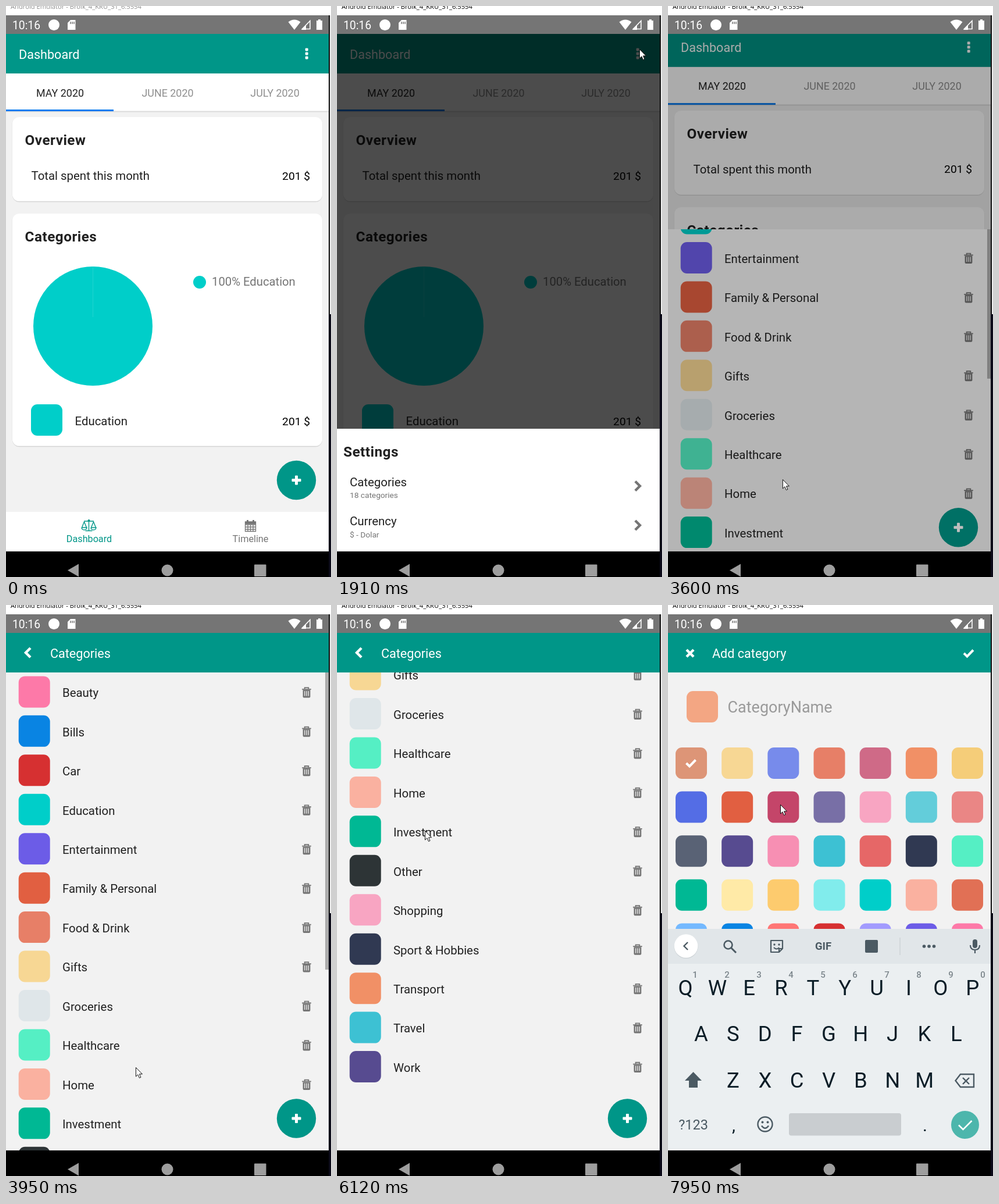
Write an HTML page that moves like this. It is 559 by 982 pixels and loops after 8000 ms.

```html
<!DOCTYPE html>
<html lang="en">
<head>
<meta charset="utf-8">
<title>Budget app</title>
<style>
  html, body { margin: 0; width: 100%; height: 100%; overflow: hidden; background: #fff; }
  svg { display: block; width: 100%; height: 100%; }
  text { font-family: Roboto, sans-serif; white-space: pre; }
</style>
</head>
<body>
<svg id="stage" viewBox="0 0 559 982" xmlns="http://www.w3.org/2000/svg"></svg>
<script>
const LOOP = 8000, STEP = 67.5, TOP = 48, BOTTOM = 938, WIDTH = 555, HEIGHT = BOTTOM - TOP;
const TEAL = '#009688', INK = '#212121', GRAY = '#757575', PAPER = '#f2f2f2';
const ROW = 67.45, MAX_SCROLL = 502, VIEW = 822, CONTENT = 1322;

// ---- markup helpers ----
const rect = (x, y, w, h, fill, extra = '') =>
  `<rect x="${x}" y="${y}" width="${w}" height="${h}" fill="${fill}" ${extra}/>`;
const dot = (x, y, r, fill, extra = '') =>
  `<circle cx="${x}" cy="${y}" r="${r}" fill="${fill}" ${extra}/>`;
const text = (x, y, size, str, fill = INK, extra = '') =>
  `<text x="${x}" y="${y}" font-size="${size}" fill="${fill}" ${extra}>${str}</text>`;
const line = (d, color, w, extra = '') =>
  `<path d="${d}" fill="none" stroke="${color}" stroke-width="${w}" ${extra}/>`;
const shape = (d, fill) => `<path d="${d}" fill="${fill}"/>`;
const group = (id, body, extra = '') => `<g id="${id}" ${extra}>${body}</g>`;
const at = (x, y, body) => `<g transform="translate(${x} ${y})">${body}</g>`;
const MID = 'text-anchor="middle"', END = 'text-anchor="end"';
const ROUND = 'stroke-linecap="round" stroke-linejoin="round"';

const swatch = (x, y, fill) => rect(x, y, 54, 54, fill, 'rx="11"');
const heading = (x, y, str) => text(x, y, 24.3, str, INK, 'font-weight="700" letter-spacing=".5"');
const header = (x, title) => rect(0, TOP, WIDTH, 68, TEAL) + text(x, 90.5, 21.6, title, '#fff');
const check = (x, y, s) => at(x, y, line(`M${-8 * s} 0L${-2.5 * s} ${5.5 * s}L${8 * s} ${-5.5 * s}`, '#fff', 4 * s));
const chevron = (x, y, dir, color) => at(x, y, line(`M${-4 * dir} -8L${4 * dir} 0L${-4 * dir} 8`, color, 4.4));
const fab = (id, y) => group(id, dot(499.5, y, 33.7, TEAL) +
  rect(491.5, y - 2.5, 16, 5, '#fff', 'rx="1"') + rect(497, y - 8, 5, 16, '#fff', 'rx="1"'));
const trash = y => at(517, y,
  line('M-7.8 -5.5H7.8M-3.3 -6V-8.3H3.3V-6', GRAY, 1.8) +
  shape('M-6.4 -4.5H6.4V7Q6.4 9 4.4 9H-4.4Q-6.4 9 -6.4 7Z', GRAY) +
  line('M-3.2 -2.5V6M0 -2.5V6M3.2 -2.5V6', PAPER, 1.3));

// ---- screens ----
function dashboard() {
  const card = (y, h) => rect(11, y + 1.2, 533, h, '#d4d4d4', 'rx="12"') +
    rect(10.5, y, 534, h, '#e6e6e6', 'rx="12"') + rect(11, y, 533, h - .5, '#fff', 'rx="11.5"');
  const tab = (x, str, color) => text(x, 155.5, 17.9, str, color, MID);
  const scales = at(142.5, 893,
    line('M0 -9V9M-6 9.5H6M-8.5 -7H8.5M-8 -6L-12 4M-8 -6L-4 4M8 -6L4 4M8 -6L12 4', TEAL, 1.4) +
    line('M-12.5 4H-3.5Q-4 8 -8 8T-12.5 4M3.5 4H12.5Q12 8 8 8T3.5 4', TEAL, 1.4) + dot(0, -8, 2, TEAL));
  const calendar = at(420.5, 894,
    line('M-9 -7H9V9.5H-9ZM-9 -2H9M-9 2H9M-9 6H9M-4.5 -2V9M0 -2V9M4.5 -2V9', GRAY, 1.3) +
    rect(-9, -7, 18, 4, GRAY) + line('M-5 -10V-5M5 -10V-5', GRAY, 3));
  return rect(0, TOP, WIDTH, HEIGHT + 30, PAPER) + header(22, 'Dashboard') +
    [75, 82, 89].map(y => rect(514.7, y - 2.6, 5, 5, '#fff', 'rx="1.3"')).join('') +
    rect(0, 116, WIDTH, 66.5, '#dcdcdc') + rect(0, 116, WIDTH, 64.5, '#fff') + rect(0, 178, 185, 3, '#0a7cf0') +
    tab(93, 'MAY 2020', INK) + tab(278, 'JUNE 2020', '#8f8f8f') + tab(462.5, 'JULY 2020', '#8f8f8f') +
    card(191, 145) + heading(32.5, 239, 'Overview') +
    text(43.5, 299, 20.4, 'Total spent this month') + text(523, 298.5, 19.2, '201 $', '#000', END) +
    card(357, 400) + heading(32.5, 405, 'Categories') +
    dot(149.5, 550.5, 102.5, '#00cec9') + line('M149.5 448V535', '#22d4d0', 1) +
    dot(333, 475, 11, '#00cec9') + text(354, 481, 20.25, '100% Education', GRAY) +
    swatch(43, 685, '#00cec9') + text(118.5, 721, 20.4, 'Education') + text(523, 720.5, 19.2, '201 $', '#000', END) +
    fab('dashFab', 815.5) + rect(0, 870, WIDTH, 98, '#fff') + scales + calendar +
    text(143, 922, 16.2, 'Dashboard', TEAL, MID) + text(420.5, 922, 16.2, 'Timeline', GRAY, MID);
}

const CATEGORIES = `Beauty fd79a8,Bills 0984e3,Car d63031,Education 00cec9,Entertainment 6c5ce7,
Family &amp; Personal e15f41,Food &amp; Drink e77f67,Gifts f7d794,Groceries dfe6e9,Healthcare 55efc4,
Home fab1a0,Investment 00b894,Other 2d3436,Shopping f8a5c2,Sport &amp; Hobbies 303952,
Transport f19066,Travel 3dc1d3,Work 574b90`.split(',').map(s => s.trim());

function categories() {
  const rows = CATEGORIES.map((entry, i) => {
    const cut = entry.lastIndexOf(' '), y = 122.4 + i * ROW;
    return swatch(21.7, y, '#' + entry.slice(cut + 1)) +
      text(97, y + 35.8, 20.4, entry.slice(0, cut)) + trash(y + 28);
  }).join('');
  return rect(0, TOP, WIDTH, HEIGHT + 40, PAPER) + group('list', rows) +
    rect(549, 116, 6, VIEW * VIEW / CONTENT, '#000', 'id="bar"') +
    header(76, 'Categories') + chevron(38, 82, -1, '#fff') + fab('listFab', 883);
}

const PALETTE = `dd9577 f7d794 778beb e77f67 cf6a87 f19066 f5cd79 546de5 e15f41 c44569 786fa6 f8a5c2 63cdda ea8685
596275 574b90 f78fb3 3dc1d3 e66767 303952 55efc4 00b894 ffeaa7 fdcb6e 81ecec 00cec9 fab1a0 e17055
74b9ff 0984e3 ff7675 d63031 a29bfe 6c5ce7 fd79a8 dfe6e9 b2bec3 636e72 2d3436`.split(/\s+/);

function addCategory() {
  const grid = PALETTE.map((c, i) =>
    swatch(13 + i % 7 * 79.17, 245 + Math.floor(i / 7) * 75.6, '#' + c)).join('');
  return rect(0, TOP, WIDTH, HEIGHT + 40, PAPER) + header(76, 'Add category') +
    line('M32 77L44 89M44 77L32 89', '#fff', 4.4) + check(517, 83, 1) +
    swatch(32, 148, '#f3a683') + text(102.5, 185, 27, 'CategoryName', '#9a9a9a') +
    grid + check(39.5, 272, 1);
}

function keyboard() {
  const tone = '#4b5a63', ink = '#0b1d27';
  const keys = (str, x, y) => [...str].map((c, i) => text(x + i * 54.85, y, 36.5, c, ink, MID)).join('');
  const hints = [...'1234567890'].map((c, i) =>
    text(46.5 + i * 55, 641, 15, c, '#7b858b', MID + ' font-weight="500"')).join('');
  const face = at(167, 893, dot(0, 0, 12.5, 'none', `stroke="${tone}" stroke-width="2.4"`) +
    dot(-4.5, -3.5, 2, tone) + dot(4.5, -3.5, 2, tone) + line('M-6 2.5Q0 11 6 2.5', tone, 2.4));
  const mic = at(528, 587, rect(-4, -12, 8, 15, tone, 'rx="4"') +
    line('M-8 -2Q-8 6 0 6T8 -2M0 6V12', tone, 2.2));
  const sticker = at(187, 587, line('M-10 -10H10V4L4 10H-10ZM4 10V4H10', tone, 2.2, ROUND) +
    dot(-4, -3, 1.7, tone) + dot(4, -3, 1.7, tone) + line('M-5 2Q0 7 4 2', tone, 2));
  return rect(0, 557, WIDTH, 60, '#e1e6e9') + rect(0, 617, WIDTH, 330, '#ebeff1') +
    dot(31, 587.5, 20.5, '#ccd2d6') + dot(31, 586.5, 20.3, '#fff') + line('M34 580L27.5 586.5L34 593', tone, 2.4) +
    dot(103.5, 584.5, 7, 'none', `stroke="${tone}" stroke-width="2.6"`) + line('M108.5 589.5L117 598', tone, 3) +
    sticker + text(267, 593, 18.5, 'GIF', tone, MID + ' font-weight="700"') + rect(339, 576, 22, 22, tone, 'rx="2"') +
    rect(398.5, 572, 1, 30, '#c3cace') + [440.5, 449, 457.5].map(x => dot(x, 587, 2.8, tone)).join('') + mic +
    hints + keys('QWERTYUIOP', 30, 671) + keys('ASDFGHJKL', 57, 750) + keys('ZXCVBNM', 112, 830) +
    shape('M43.5 803L58 818H51V830H36V818H29Z', tone) +
    line('M503 807H526V829H503L494.5 818ZM507 813L518 824M518 813L507 824', tone, 2.4) +
    text(43.5, 902, 23.5, '?123', tone, MID) + text(113, 905, 30, ',', ink, MID) + face +
    rect(208, 874, 193, 38.5, '#c9cdd0', 'rx="4"') + text(442, 905, 30, '.', ink, MID) +
    dot(511, 894, 24, '#4db6ac') + line('M500 894.5L507.5 902L522.5 887', '#fff', 2.6);
}

function settings() {
  const row = (y, title, note) => text(22, y, 20.4, title) +
    text(22, y + 20.5, 13.7, note, GRAY) + chevron(517, y, 1, GRAY);
  return rect(0, 727, WIDTH, 211, '#fff') + heading(11, 775, 'Settings') +
    rect(0, 793, WIDTH, 67, '#efefef', 'id="press"') +
    group('pressText', row(825.5, 'Categories', '18 categories')) + row(893, 'Currency', '$ - Dolar');
}

function chrome() {
  return rect(0, 16, WIDTH, 32, '#757575') + text(11, 40, 19.3, '10:16', '#fff') +
    dot(82.5, 32.5, 9.5, '#fff') +
    shape('M111 24H119.5V41H106V29Z', '#fff') + line('M111 27V31M114 27V31M117 27V31', '#757575', 1.5) +
    shape('M485.5 27.5Q496 19.5 506.5 27.5L496 41Z', '#fff') +
    line('M509.5 39.5L523 25.5V39.5Z', '#fff', 1.6) + shape('M508 41L516 33V41Z', '#fff') +
    shape('M534 25H537V23H541V25H544V41H534Z', '#fff') +
    rect(0, BOTTOM, WIDTH, 44, '#000') + shape('M106 970.5L125 959.5V981.5Z', '#9e9e9e') +
    dot(277.5, 970.5, 10, '#9e9e9e') + rect(427, 960.5, 20.5, 20.5, '#9e9e9e', 'rx="1"') +
    rect(WIDTH, 0, 4, 530, '#fff') + rect(WIDTH, 16, 2.2, 514, '#111') + rect(WIDTH, 530, 4, 452, '#0b0a18');
}

const clip = (id, y) => `<clipPath id="${id}"><rect x="0" y="${y}" width="${WIDTH}" height="${BOTTOM - y}"/></clipPath>`;
const shade = id => rect(0, TOP, WIDTH, HEIGHT, '#000', `id="${id}"`);

document.getElementById('stage').innerHTML =
  `<defs>${clip('app', TOP)}${clip('clipCats', TOP)}${clip('clipAdd', TOP)}</defs>` +
  rect(0, 0, 559, 982, '#fff') +
  `<text id="caption" x="8" y="4.5" font-size="11.2" style="font-family:'Open Sans',sans-serif">Android Emulator - Brolk_4_KRU_31_6:5554</text>` +
  `<g clip-path="url(#app)">` +
    group('dash', dashboard()) + shade('dashShade') +
    `<g clip-path="url(#clipCats)">${group('cats', categories())}</g>` + shade('catsShade') +
    `<g clip-path="url(#clipAdd)">${group('add', addCategory())}</g>` +
    group('keys', keyboard()) + shade('dim') + group('sheet', settings()) +
  `</g>` + chrome() + dot(0, 0, 12.5, '#f8f46a', 'id="halo" opacity=".9"') +
  group('cursor', `<path d="M.5 .5V16L4 12.7L6.5 18.5L9 17.4L6.6 11.8H11.5Z" fill="#fff" stroke="#111" stroke-width="1"/>`);

// ---- timing ----
const $ = Object.fromEntries([...document.querySelectorAll('[id]')].map(el => [el.id, el]));
const clamp = v => Math.max(0, Math.min(1, v));
const span = (t, start, length) => clamp((t - start) / length);
const smooth = p => p * p * (3 - 2 * p);
const easeOut = p => 1 - (1 - p) ** 3;

function bezier(x1, y1, x2, y2) {
  const f = (s, a, b) => 3 * (1 - s) ** 2 * s * a + 3 * (1 - s) * s * s * b + s ** 3;
  return x => {
    if (x <= 0 || x >= 1) return clamp(x);
    let lo = 0, hi = 1;
    for (let i = 0; i < 24; i++) {
      const mid = (lo + hi) / 2;
      if (f(mid, x1, x2) < x) lo = mid; else hi = mid;
    }
    return f(lo, y1, y2);
  };
}
const ease = bezier(.25, .1, .25, 1), reveal = bezier(.20833, .82, .25, 1);

// Screen recording: motion advances in even steps and rests between bursts.
const BURSTS = [[130, 900], [970, 1110], [1300, 1440], [1640, 1910], [2370, 2930], [3190, 3260],
  [3530, 4280], [4350, 5100], [5170, 5590], [6120, 6860], [6940, 7070], [7270, 7950]];
function snap(t) {
  let now = 0;
  for (const [start, end] of BURSTS) {
    if (t < start) break;
    now = t >= end ? end : start + Math.floor((t - start) / STEP) * STEP;
  }
  return now;
}

const PATH = [[130, 444, 908], [900, 513, 92], [1110, 520, 74], [2300, 520, 74], [2930, 194, 837], [3190, 194, 839],
  [3530, 194, 839], [3600, 197, 813], [4280, 250, 776], [4620, 265, 366], [4690, 275, 320], [4830, 270, 325],
  [5100, 200, 371], [5300, 137, 380], [5590, 149, 381], [6120, 151, 388], [6860, 485, 898], [7200, 485, 898], [7950, 193, 343]];
function pointer(t) {
  let i = 0;
  while (i < PATH.length - 2 && t >= PATH[i + 1][0]) i++;
  const [t0, x0, y0] = PATH[i], [t1, x1, y1] = PATH[i + 1];
  let p = span(t, t0, t1 - t0);
  if (t1 - t0 > 400) p = smooth(p);
  return [x0 + (x1 - x0) * p, y0 + (y1 - y0) * p];
}

function scrollAt(t, y) {
  if (t < 4290) return 0;
  if (t <= 4690) return Math.max(0, 776 - y);
  return 456 + (MAX_SCROLL - 456) * easeOut(span(t, 4690, 350));
}

const move = (el, x, y) => el.setAttribute('transform', `translate(${x.toFixed(2)} ${y.toFixed(2)})`);
const fade = (el, v) => el.setAttribute('opacity', v.toFixed(3));
const show = (el, on) => el.setAttribute('visibility', on ? 'visible' : 'hidden');

// Uncovers a card from the bottom while the one below drifts up and darkens.
function open(card, clipPath, under, underY, shadeEl, p) {
  const rest = HEIGHT * (1 - p), edge = clipPath.firstElementChild;
  show(card, p > 0);
  edge.setAttribute('y', TOP + rest);
  edge.setAttribute('height', HEIGHT - rest);
  move(card, 0, rest * .041);
  move(under, 0, underY - .02 * HEIGHT * p);
  fade(shadeEl, .1 * clamp(p / .36));
}

function draw(time) {
  const t = snap(time), [x, y] = pointer(t);
  $.caption.setAttribute('fill', t < 1300 ? '#8c8c8c' : '#000');

  const modal = t < 3400 ? ease(span(t, 1553, 300)) : 1 - ease(span(t, 3487, 300));
  fade($.dim, .7 * modal);
  move($.sheet, 0, HEIGHT * (1 - modal));
  const press = t >= 3190 && t < 3500 ? (t < 3250 ? .5 : 1) : 0;
  fade($.press, press);
  fade($.pressText, 1 - .18 * press);

  const listed = reveal(span(t, 3519, 425)), added = reveal(span(t, 7262, 425));
  open($.cats, $.clipCats, $.dash, 0, $.dashShade, listed);
  open($.add, $.clipAdd, $.cats, HEIGHT * (1 - listed) * .041, $.catsShade, added);

  const scroll = scrollAt(t, y);
  move($.list, 0, -scroll);
  move($.bar, 0, scroll * VIEW / CONTENT);
  fade($.bar, .29 * (1 - span(t, 5100, 300)));
  fade($.listFab, 1 - .45 * Math.sin(Math.PI * span(t, 6880, 190)));

  const typing = easeOut(span(t, 7400, 320));
  show($.keys, typing > 0);
  move($.keys, 0, 381 * (1 - typing));

  show($.cursor, t >= 130);
  move($.cursor, x, y);
  show($.halo, t > 4300 && t < 4720);
  move($.halo, x, y);
}

const begin = performance.now();
function tick() {
  draw((performance.now() - begin) % LOOP);
  requestAnimationFrame(tick);
}
tick();
</script>
</body>
</html>
```
